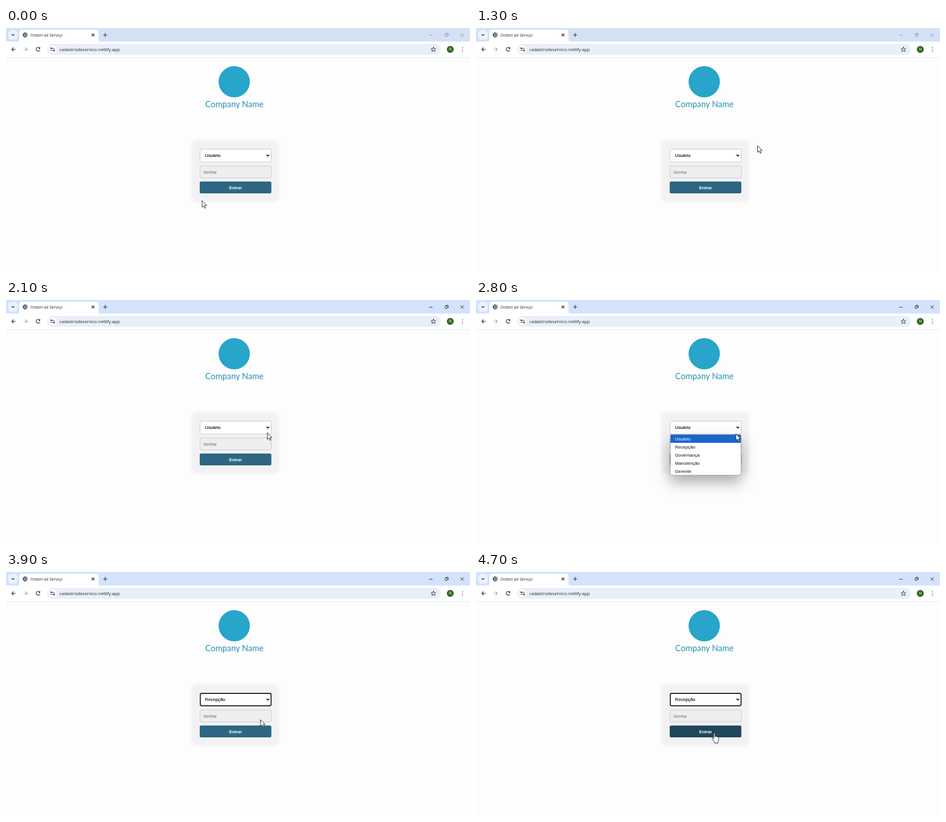
An HTML page for the animation above (5 s loop, 800 by 422 pixels).

```html
<!DOCTYPE html>
<html lang="pt">
<head>
<meta charset="utf-8">
<title>Ordem de Serviço</title>
<style>
html, body { margin: 0; width: 100%; height: 100%; overflow: hidden; background: #fefdfe; }
svg { display: block; width: 800px; height: 422px; }
text { white-space: pre; }
.ui { font-family: "Open Sans", "Noto Sans", sans-serif; fill: #25282c; }
.form { font: 7.8px "Liberation Sans", Arial, sans-serif; fill: #111; }
.field { stroke: #111; stroke-width: .15px; }
.brand { font: 14.4px Lato, sans-serif; fill: #2b95b0; }
.line { fill: none; stroke: #33373c; stroke-width: 1.1; stroke-linecap: round; stroke-linejoin: round; }
.card { filter: drop-shadow(0 0 3px rgba(0, 0, 0, .09)); }
.popup-box { filter: drop-shadow(0 12px 12px rgba(0, 0, 0, .32)); }

.step { animation: 5s step-end infinite; }
.strip { animation-name: strip; }
.controls { animation-name: controls; }
.popup { animation-name: popup; }
.highlight { animation-name: highlight; }
.first { animation-name: first; }
.second { animation-name: second; }
.before { animation-name: before; }
.after { animation-name: after; }
.button { animation-name: button; }
.pointer { animation-name: move; }
.arrow { animation-name: arrow; }
.hand { animation-name: hand; }

@keyframes strip { 0% { fill: #d4e1f5; } 42%, 100% { fill: #d3e3fd; } }
@keyframes controls { 0% { stroke: #8b929b; } 42%, 100% { stroke: #24272b; } }
@keyframes popup { 0% { opacity: 0; } 44% { opacity: .5; } 46% { opacity: 1; } 78%, 100% { opacity: 0; } }
@keyframes highlight { 0% { transform: none; } 60%, 100% { transform: translateY(14px); } }
@keyframes first { 0% { fill: #fff; } 60%, 100% { fill: #111; } }
@keyframes second { 0% { fill: #111; } 60%, 100% { fill: #fff; } }
@keyframes before { 0% { opacity: 1; } 78%, 100% { opacity: 0; } }
@keyframes after { 0% { opacity: 0; } 78%, 100% { opacity: 1; } }
@keyframes button {
  0% { fill: #2c6682; }
  90% { fill: #285c75; }
  92% { fill: #245267; }
  94%, 100% { fill: #1f475a; }
}
@keyframes arrow { 0% { opacity: 1; } 18% { opacity: 0; } 20% { opacity: 1; } 88%, 100% { opacity: 0; } }
@keyframes hand { 0% { opacity: 0; } 18% { opacity: 1; } 20% { opacity: 0; } 88%, 100% { opacity: 1; } }
@keyframes move {
  0% { transform: translate(337.5px, 298px); }
  18% { transform: translate(409.5px, 270.5px); }
  20% { transform: translate(440px, 248px); }
  22% { transform: translate(466px, 230px); }
  24% { transform: translate(489px, 212px); }
  26% { transform: translate(485px, 203px); }
  28% { transform: translate(473px, 201px); }
  30% { transform: translate(466px, 208px); }
  32% { transform: translate(459px, 218px); }
  34% { transform: translate(453px, 225px); }
  36% { transform: translate(450px, 229px); }
  56% { transform: translate(447.5px, 231px); }
  58% { transform: translate(446px, 238px); }
  60% { transform: translate(444px, 247px); }
  62% { transform: translate(441px, 253px); }
  64% { transform: translate(436px, 256px); }
  66% { transform: translate(433px, 254px); }
  68% { transform: translate(438.3px, 255px); }
  86% { transform: translate(437px, 260px); }
  88% { transform: translate(431px, 267px); }
  90% { transform: translate(420px, 275px); }
  92% { transform: translate(413px, 279px); }
  94%, 100% { transform: translate(411.5px, 279px); }
}
</style>
</head>
<body>
<svg viewBox="0 0 800 422">
  <rect width="800" height="422" fill="#fefdfe"/>

  <!-- Tab strip -->
  <rect class="step strip" width="800" height="24"/>
  <rect x="4" y="4" width="16" height="16" rx="5" fill="#edf3fe"/>
  <path class="line" d="M10 11l2 2 2-2"/>
  <path d="M19 23.5q4 0 4-4V8q0-5 5-5h126.500q5 0 5 5v11.500q0 4 4 4z" fill="#fff"/>
  <circle cx="33" cy="12" r="4.200" fill="#41464c"/>
  <path d="M30 10q3 0 2.500 2.500T30.500 14M34 8.800q-1 2 2 2.200M34 15.200q-1-2.200 2.500-2.700" fill="none" stroke="#fff" stroke-width="1"/>
  <text class="ui" x="42" y="14.600" font-size="6.700">Ordem de Serviço</text>
  <path class="line" d="M148 10l4 4m0-4l-4 4M168 12h6m-3-3v6"/>
  <g class="line step controls" style="stroke-width:.9">
    <path d="M730 12.500h5M784 9.500l5 5m0-5l-5 5"/>
    <rect x="757" y="10.500" width="4" height="4" rx=".8"/>
    <path d="M758.500 9.200h3q1 0 1 1v3"/>
  </g>

  <!-- Toolbar -->
  <rect y="23.500" width="800" height="27.500" fill="#fff"/>
  <rect y="50.500" width="800" height="1" fill="#e3e6ec"/>
  <path class="line" d="M16.500 37h-6.500m3-3l-3 3 3 3"/>
  <path class="line" d="M30.500 37h6.500m-3-3l3 3-3 3" style="stroke:#a7abb0"/>
  <path class="line" d="M58 35a3.300 3.300 0 1 0 .3 3M58.400 33.300v2.200h-2.200"/>
  <rect x="71" y="27.500" width="679" height="19" rx="9.500" fill="#e9eef8"/>
  <circle cx="80.500" cy="37" r="7" fill="#fff"/>
  <g class="line">
    <path d="M80.500 35.200h3M77.300 38.800h3"/>
    <circle cx="78.200" cy="35.200" r="1.100"/>
    <circle cx="82.800" cy="38.800" r="1.100"/>
  </g>
  <text class="ui" x="92" y="39.700" font-size="7.660">cadastrodeservico.netlify.app</text>
  <path class="line" style="stroke-width:.9" d="M737 33l1.200 2.700 2.900.3-2.200 1.900.7 2.900-2.600-1.600-2.600 1.600.7-2.900-2.200-1.900 2.900-.3z"/>
  <circle cx="766" cy="37" r="6" fill="#2f6b20"/>
  <text class="ui" x="766" y="39.200" font-size="6.200" text-anchor="middle" style="fill:#fff">N</text>
  <path class="line" d="M787 33.800v0M787 37v0M787 40.200v0" style="stroke-width:1.600"/>

  <!-- Brand -->
  <circle cx="393.500" cy="93" r="27" fill="#27a5cb"/>
  <text class="brand" x="343.500" y="136.700">Company Name</text>

  <!-- Login card -->
  <rect class="card" x="322" y="196.500" width="147" height="101.500" rx="5" fill="#f2f1f3"/>
  <g class="step before">
    <rect x="334.500" y="209.500" width="123" height="22.500" rx="2.500" fill="#fff" stroke="#cbcacc"/>
    <text class="form field" x="343" y="223.300">Usuário</text>
  </g>
  <g class="step after">
    <rect x="335" y="209.900" width="122" height="21.500" rx="2.500" fill="#fff" stroke="#111317" stroke-width="1.600"/>
    <text class="form field" x="343" y="223.300">Recepção</text>
  </g>
  <path class="line" d="M449.400 219.500l2 2 2-2" style="stroke:#111;stroke-width:1.400"/>
  <rect x="334.500" y="238.500" width="123" height="21" rx="2.500" fill="#eeedef" stroke="#cfced0"/>
  <text class="form" x="340.400" y="251.500" style="fill:#88878a;stroke:#88878a;stroke-width:.2px">Senha</text>
  <rect class="step button" x="334" y="265.500" width="123.500" height="20.500" rx="2.500"/>
  <text class="form" x="395.800" y="278.500" text-anchor="middle" style="fill:#fff;font-weight:bold;font-size:7.500px">Entrar</text>

  <!-- Option list -->
  <g class="step popup">
    <rect class="popup-box" x="335" y="232.700" width="122" height="70.300" rx="3" fill="#fff" stroke="#8a8a8d" stroke-width=".7"/>
    <rect class="step highlight" x="335.300" y="233" width="121.400" height="14" fill="#1966cf"/>
    <g class="form">
      <text class="step first" x="343" y="242.700">Usuário</text>
      <text class="step second" x="343" y="256.700">Recepção</text>
      <text x="343" y="270.700">Governança</text>
      <text x="343" y="284.700">Manutenção</text>
      <text x="343" y="298.700">Gerente</text>
    </g>
  </g>

  <!-- Pointer -->
  <g class="step pointer" fill="#fff" stroke="#222" stroke-width=".9" stroke-linejoin="round">
    <path class="step arrow" d="M.5.5v11.500l2.600-2.400 2 4.200 1.800-.8-1.900-4.100h3.600z"/>
    <path class="step hand" d="M-1.500 1q0-1.200 1.100-1.200T.8 1v5q.2-1 1.200-.9t1 1q.2-.8 1.100-.6t.9 1q.2-.7 1-.4t.7 1.200v3.700q0 2-1.200 3.500v2.500h-5.500v-2L-3.600 10.800q-1.200-1.800-.4-2.500t1.600.4l.9 1z"/>
  </g>
</svg>
</body>
</html>
```
